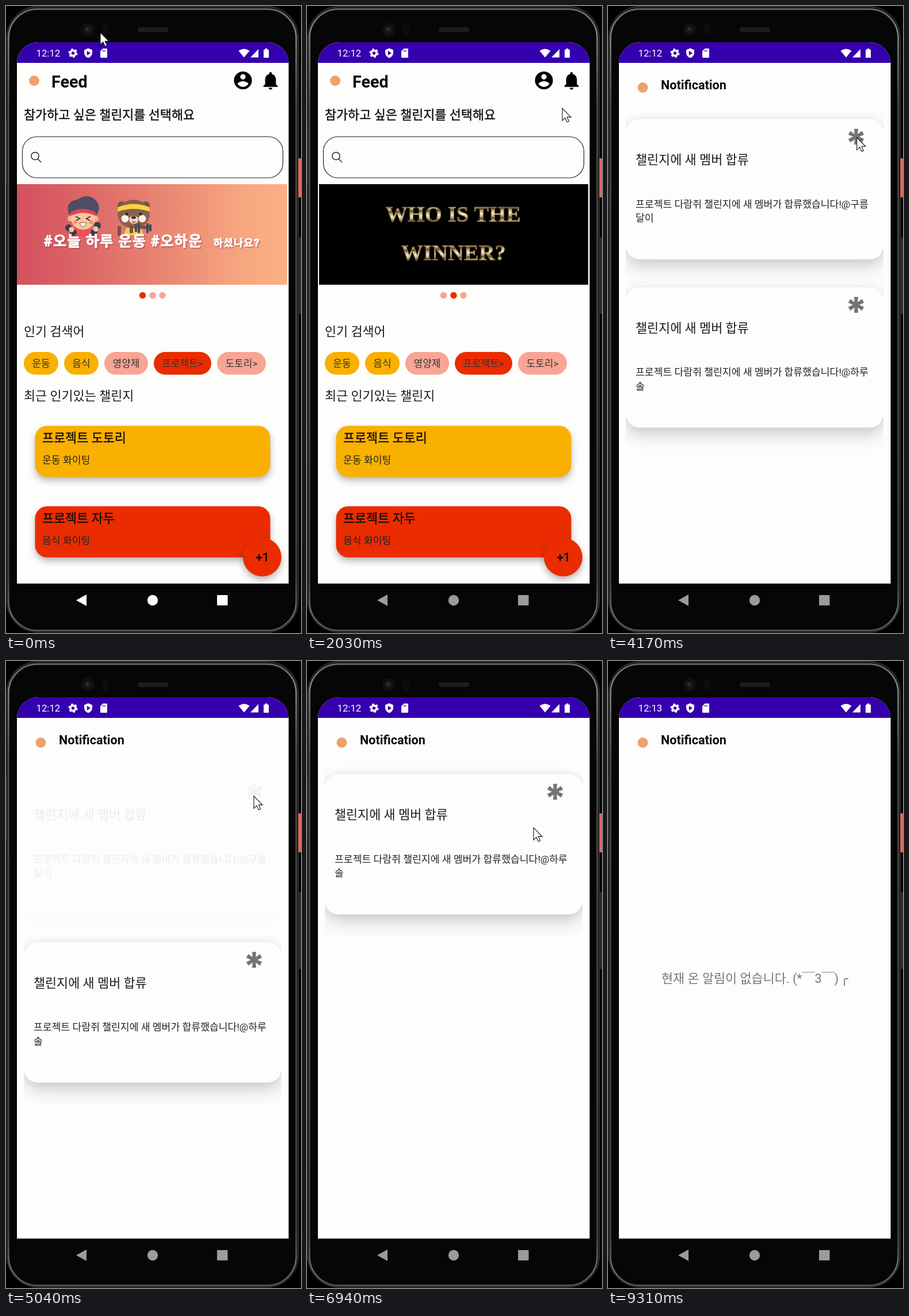
Write an HTML page that moves like this. It is 513 by 1091 pixels and loops after 9.35 s.

```html
<!DOCTYPE html>
<html lang="ko">
<head>
<meta charset="utf-8">
<title>Challenge feed</title>
<style>
html, body { margin: 0; width: 100%; height: 100%; overflow: hidden; background: #000; }
svg { display: block; width: 513px; height: 1091px; }
text { font: 21.8px Roboto, "Noto Sans CJK KR", "Noto Sans CJK", sans-serif; white-space: pre; fill: #1b1b1b; }
.mid { font-weight: 500; fill: #0c0c0c; stroke: #0c0c0c; stroke-width: .35px; }
.small { font-size: 17.2px; fill: #222; }
.chip { font-size: 17px; fill: #333; text-anchor: middle; }
.lift { filter: drop-shadow(0 6px 6px rgba(0,0,0,.28)); }
.note { filter: drop-shadow(0 14px 15px rgba(0,0,0,.17)) drop-shadow(0 0 8px rgba(0,0,0,.07)); }
.gold { font: bold 38px "Liberation Serif", serif; fill: url(#gold); stroke: #8d7545; stroke-width: 1px; text-anchor: middle; letter-spacing: .4px; }
.slogan { font-weight: 900; fill: #fff; stroke: #fff; stroke-width: .8px; letter-spacing: 1.5px; filter: drop-shadow(2px 2px 0 rgba(150,50,70,.45)); }
</style>
</head>
<body>
<svg viewBox="0 0 513 1091" xmlns="http://www.w3.org/2000/svg">
<defs>
  <linearGradient id="warm"><stop stop-color="#d5505e"/><stop offset=".25" stop-color="#dc6666"/><stop offset=".85" stop-color="#f8a880"/><stop offset="1" stop-color="#fbb087"/></linearGradient>
  <linearGradient id="gold" x1="0" y1="0" x2=".06" y2=".3" spreadMethod="reflect"><stop stop-color="#f4ecd2"/><stop offset=".45" stop-color="#b59c67"/><stop offset=".6" stop-color="#54421f"/><stop offset="1" stop-color="#d8c693"/></linearGradient>
  <linearGradient id="rim" x2="0" y2="1"><stop stop-color="#6c6c6e"/><stop offset=".04" stop-color="#8a8a8d"/><stop offset=".16" stop-color="#4c4c4e"/><stop offset=".92" stop-color="#464648"/><stop offset=".97" stop-color="#707073"/><stop offset="1" stop-color="#58585a"/></linearGradient>
  <clipPath id="screen"><path d="M19 1005V100A37 37 0 0 1 56 63H454.500A37 37 0 0 1 491.500 100V1005Z"/></clipPath>
  <clipPath id="pager"><rect x="19" y="310" width="472" height="175"/></clipPath>
  <clipPath id="cell"><rect x="31" y="174" width="448" height="308"/></clipPath>
</defs>

<!-- phone body -->
<rect width="513" height="1091"/>
<rect x="1" y=".5" width="507.500" height="1089.500" rx="55" fill="#1e1e1e" stroke="#3f3f3a"/>
<rect x="4.500" y="5.500" width="500" height="1081" rx="50" fill="#060607" stroke="url(#rim)" stroke-width="2.400"/>
<rect x="508.500" y="265" width="4.500" height="68" rx="1" fill="#e5685a"/>
<rect x="509.500" y="402" width="3.500" height="134" rx="1" fill="#2f2f2f"/>
<rect y="202" width="2" height="108" fill="#333"/>
<circle cx="142" cy="41" r="11.500" fill="#101011"/><circle cx="142" cy="41" r="5.500" fill="#1d1e20"/><circle cx="140.500" cy="40" r="1.800" fill="#3c3e42"/>
<rect x="166" y="30" width="13" height="22" rx="6.500" fill="#0c0c0c"/>
<rect x="229" y="37" width="53" height="8.500" rx="4" fill="#1d1d1d"/>

<g clip-path="url(#screen)">
  <rect x="19" y="63" width="473" height="942" fill="#fdfdfc"/>

  <g id="feed">
    <circle cx="49" cy="130" r="9" fill="#eda26e"/>
    <text x="79" y="142" style="font-size:28.700px;font-weight:700;fill:#0c0c0c">Feed</text>
    <path transform="translate(393.300 110.800) scale(1.56)" d="M12 2a10 10 0 1 0 0 20a10 10 0 1 0 0-20zm0 3a3 3 0 1 1 0 6a3 3 0 1 1 0-6zm0 14.200c-2.500 0-4.700-1.300-6-3.200c0-2 4-3.100 6-3.100s6 1.100 6 3.100c-1.300 1.900-3.500 3.200-6 3.200z" fill-rule="evenodd"/>
    <path transform="translate(441.300 111.100) scale(1.56)" d="M12 22c1.100 0 2-.9 2-2h-4c0 1.100.9 2 2 2zm6-6v-5c0-3.100-1.600-5.600-4.500-6.300V4a1.500 1.500 0 0 0-3 0v.7C7.600 5.400 6 7.900 6 11v5l-2 2v1h16v-1z"/>
    <text class="mid" x="31" y="197">참가하고 싶은 챌린지를 선택해요</text>
    <rect x="28.500" y="227.500" width="453" height="71.500" rx="25" fill="none" stroke="#252530" stroke-width="1.200"/>
    <g fill="none" stroke="#33202c" stroke-width="1.500"><circle cx="50.500" cy="261" r="6.600"/><path d="M55.200 266L61 272"/></g>

    <g clip-path="url(#pager)"><g id="slides">
      <rect x="19" y="310" width="470" height="175" fill="url(#warm)"/>
      <!-- boxer kid -->
      <g transform="translate(134 365)">
        <path d="M-19 38Q-20 20 0 19Q20 20 19 38Z" fill="#e9525c"/>
        <circle cx="-22" cy="5" r="5" fill="#f6b488"/><circle cx="22" cy="5" r="5" fill="#f6b488"/>
        <ellipse cy="4" rx="21" ry="20" fill="#fac69c"/>
        <path d="M-24-1Q-33-25-10-28Q8-41 22-27Q33-16 23-1Q15-13-8-11Q-20-9-24-1Z" fill="#4e4c66"/>
        <path d="M-22-6Q0-18 22-6L21 0Q0-10-21 0Z" fill="#de4651"/>
        <path d="M-13 1l7 4-7 4M13 1l-7 4 7 4" fill="none" stroke="#4a3540" stroke-width="2"/>
        <path d="M-6 12H6Q4 19 0 19T-6 12Z" fill="#fff" stroke="#8f4b45"/>
        <circle cx="-14" cy="11" r="3.500" fill="#f3907d"/><circle cx="14" cy="11" r="3.500" fill="#f3907d"/>
        <g fill="#3d3c4d"><circle cx="-25" cy="21" r="6"/><circle cx="-17" cy="29" r="6"/><circle cx="25" cy="17" r="6"/><circle cx="19" cy="29" r="6"/></g>
        <circle cx="-20" cy="24" r="4.500" fill="#fac69c"/><circle cx="22" cy="23" r="4.500" fill="#fac69c"/>
      </g>
      <!-- bear -->
      <g transform="translate(222 365)">
        <path d="M-16 34Q-16 17 0 17Q16 17 16 34Z" fill="#f7cc45"/>
        <circle cx="-21" cy="-18" r="7" fill="#795246"/><circle cx="21" cy="-18" r="7" fill="#795246"/>
        <ellipse cy="-3" rx="28" ry="25" fill="#87604f"/>
        <path d="M-27-15Q0-26 27-15L28-7Q0-17-28-7Z" fill="#f8d43f"/>
        <circle cx="-15" cy="5" r="6.500" fill="#fff0e4"/><circle cx="15" cy="5" r="6.500" fill="#fff0e4"/>
        <ellipse cy="7" rx="8" ry="7" fill="#f3d5b9"/><ellipse cy="3" rx="4" ry="2.500" fill="#40302f"/>
        <circle cx="-12" cy="-3" r="2.500" fill="#30282a"/><circle cx="12" cy="-3" r="2.500" fill="#30282a"/>
        <path d="M-4 10Q0 15 4 10Z" fill="#c44c4b"/>
        <path d="M-25 18V35M-4 17V30M7 20H28" stroke="#795246" stroke-width="6"/>
        <path d="M4 15V28M9 13V30M24 13V30M29 15V27" stroke="#45465b" stroke-width="4"/>
      </g>
      <text class="slogan" x="66" y="418" style="font-size:25px">#오늘 하루 운동 #오하운</text>
      <text class="slogan" x="361" y="418" style="font-size:17.500px">하셨나요?</text>
      <g transform="translate(472 0)">
        <rect x="21" y="310" width="468" height="175"/>
        <text class="gold" x="254.500" y="375">WHO IS THE</text>
        <text class="gold" x="255" y="442">WINNER?</text>
      </g>
    </g></g>
    <g id="dots"></g>

    <text x="31" y="574">인기 검색어</text>
    <g id="chips"></g>
    <text x="31" y="686">최근 인기있는 챌린지</text>
    <g id="cards"></g>
    <circle class="lift" cx="445.500" cy="959" r="33.500" fill="#ea2c00"/>
    <text class="mid" x="446" y="966" text-anchor="middle" style="font-size:20.500px">+1</text>
  </g>

  <g id="inbox">
    <circle cx="60.500" cy="142" r="9" fill="#eda26e"/>
    <text x="92" y="144.500" style="font-size:21.600px;font-weight:700;fill:#0c0c0c">Notification</text>
    <g id="notes"></g>
    <text id="empty" x="93" y="560" style="fill:#777">현재 온 알림이 없습니다. (*￣3￣)<tspan dx="3" style="font-family:'DejaVu Sans Mono',monospace">╭</tspan></text>
  </g>

  <!-- status bar -->
  <rect x="19" y="63" width="473" height="36" fill="#3500ae"/>
  <text id="clock" x="52.500" y="88" style="font-size:16.800px;fill:#fff"></text>
  <g fill="#fff">
    <g fill="none" stroke="#fff"><circle cx="116.500" cy="82" r="4.500" stroke-width="3.600"/><circle cx="116.500" cy="82" r="6.700" stroke-width="2.600" stroke-dasharray="3.508"/></g>
    <path d="M143 73.500L150 76.500V81Q150 87.500 143 90.500Q136 87.500 136 81V76.500ZM140.800 78V86L147 82Z" fill-rule="evenodd"/>
    <path d="M168.500 74H175Q176 74 176 75V89Q176 90 175 90H165Q164 90 164 89V78.500ZM168 76.500V79.500H169.500V76.500ZM171 76.500V79.500H172.300V76.500Z" fill-rule="evenodd"/>
    <path d="M404.500 78Q414 71 423.500 78L414 89.500ZM425 89.500L439 75V89.500ZM448 76H450.500V74H454.500V76H457V90H448Z"/>
  </g>
</g>

<g id="nav"><path d="M122 1034L140 1024V1044Z"/><circle cx="255" cy="1034" r="9.200"/><rect x="367" y="1025" width="18.500" height="18" rx="1"/></g>
<path id="cursor" d="M0 0V17.500l4-3.800 2.700 6.100 2.800-1.200-2.700-6H12.300Z" fill="#fff" stroke="#111" stroke-width=".9"/>
</svg>

<script>
const LOOP = 9350;
const $ = id => document.getElementById(id);
const YELLOW = '#f9b000', RED = '#ea2c00', PINK = '#f8a594';

$('dots').innerHTML = [237.5, 255, 272].map(x => `<circle cx="${x}" cy="503.500" r="5.700"/>`).join('');

$('chips').innerHTML = [
  [31, 60, YELLOW, '운동'], [101, 60, YELLOW, '음식'], [171, 76, PINK, '영양제'],
  [257, 100, RED, '프로젝트&gt;'], [367, 85, PINK, '도토리&gt;']
].map(([x, w, fill, label]) => `<rect x="${x}" y="602" width="${w}" height="39.500" rx="19.700" fill="${fill}"/>
  <text class="chip" x="${x + w / 2}" y="627.800">${label}</text>`).join('');

$('cards').innerHTML = [
  [730.5, YELLOW, '프로젝트 도토리', '운동 화이팅'], [870.5, RED, '프로젝트 자두', '음식 화이팅']
].map(([y, fill, title, line]) => `<rect class="lift" x="50.500" y="${y}" width="409" height="89" rx="21" fill="${fill}"/>
  <text class="mid" x="63" y="${y + 28.5}">${title}</text><text class="small" x="63" y="${y + 65.5}">${line}</text>`).join('');

const arms = [0, 60, 120, 180, 240, 300].map(a =>
  `<path d="M-2.300 0L-3.500-13.800H3.500L2.300 0Z" transform="rotate(${a})"/>`).join('');

$('notes').innerHTML = [['구름', '달이'], ['하루', '솔']].map(([head, tail]) => `<g><g clip-path="url(#cell)">
  <rect class="note" x="31" y="197" width="448" height="244" rx="24" fill="#fdfdfc"/>
  <g transform="translate(431.500 227.500)" fill="#747474">${arms}</g>
  <text x="48" y="275">챌린지에 새 멤버 합류</text>
  <text class="small" x="48" y="350.500">프로젝트 다람쥐 챌린지에 새 멤버가 합류했습니다!@${head}</text>
  <text class="small" x="48" y="375">${tail}</text></g></g>`).join('');

const dots = $('dots').children, [first, second] = $('notes').children;

const part = (t, start, length) => Math.min(1, Math.max(0, (t - start) / length));
const smooth = p => (1 - Math.cos(Math.PI * p)) / 2;
const show = (el, on) => { el.style.display = on ? '' : 'none'; };

// time, x, y
const route = [
  [0, 164, 46], [860, 279, 1050], [1050, 285, 1066], [2030, 444, 178], [2350, 459, 133],
  [2800, 459, 134], [3130, 455, 138], [3900, 433, 228], [5040, 431, 235], [5700, 400, 288],
  [6940, 394, 290], [7600, 431, 228], [8300, 431, 230], [9050, -25, 420], [LOOP, -25, 420]
];

function pointer(t) {
  const i = route.findIndex(k => k[0] > t);
  const [a, b] = [route[i - 1], route[i]];
  const p = smooth((t - a[0]) / (b[0] - a[0]));
  return [a[1] + (b[1] - a[1]) * p, a[2] + (b[2] - a[2]) * p];
}

function draw() {
  const t = performance.now() % LOOP;
  const onFeed = t < 2550;
  show($('feed'), onFeed);
  show($('inbox'), !onFeed);

  const slide = 1 - (1 - part(t, 573, 400)) ** 2;
  $('slides').setAttribute('transform', `translate(${-472 * slide} 0)`);
  const page = t < 970 ? 0 : 1;
  [...dots].forEach((d, i) => d.setAttribute('fill', i === page ? RED : PINK));

  first.style.opacity = 1 - part(t, 4930, 120);
  second.style.opacity = 1 - part(t, 8100, 120);
  const rise = smooth(part(t, 5050, 250));
  second.setAttribute('transform', `translate(0 ${292.5 * (1 - rise)})`);
  show($('empty'), t >= 8220);

  $('clock').textContent = t < 8000 ? '12:12' : '12:13';
  const grey = 255 - 80 * part(t, 100, 760) - 20 * part(t, 860, 700);
  $('nav').setAttribute('fill', `rgb(${grey},${grey},${grey})`);
  const [x, y] = pointer(t);
  $('cursor').setAttribute('transform', `translate(${x} ${y}) scale(1.22)`);
  requestAnimationFrame(draw);
}
draw();
</script>
</body>
</html>
```
